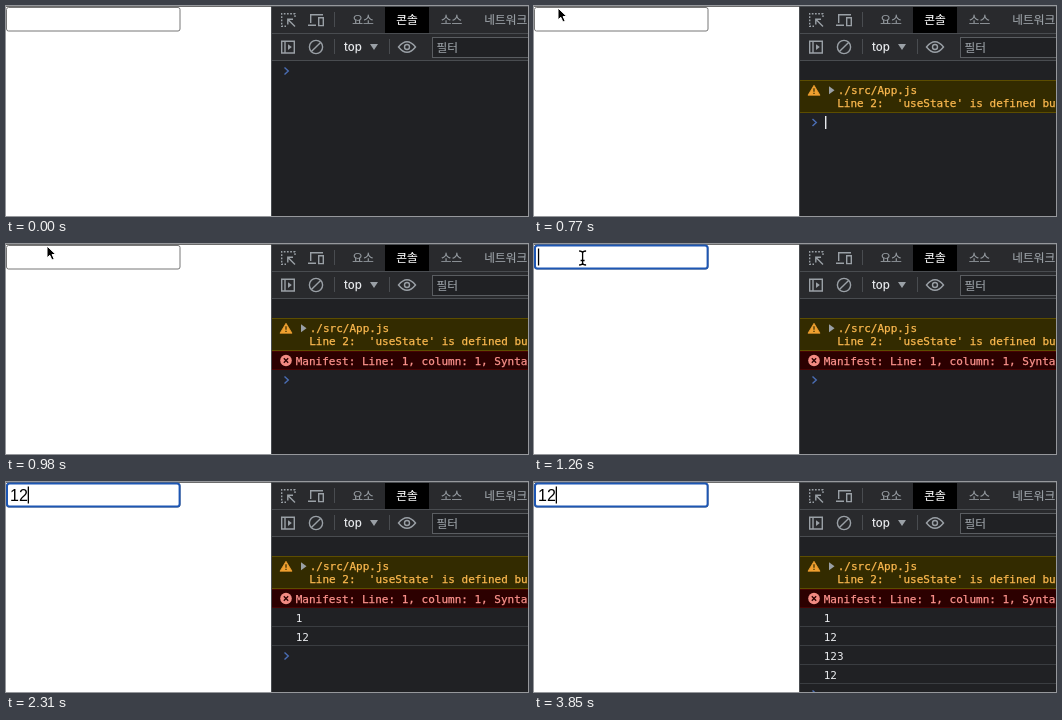
These frames come from a looping animation (522 by 210 pixels, 3920 ms). An HTML page:

```html
<!DOCTYPE html>
<html lang="ko">
<head>
<meta charset="utf-8">
<style>
html, body { margin: 0; width: 100%; height: 100%; overflow: hidden; background: #fff; }
svg { display: block; }
text { white-space: pre; }
.mono { font: 11px "DejaVu Sans Mono", monospace; stroke-width: .25; }
.ko { font: 11.7px "Noto Sans CJK KR", "Noto Sans CJK", sans-serif; fill: #9aa0a6; stroke: #9aa0a6; stroke-width: .15; }
.icon { fill: none; stroke: #9aa0a6; stroke-width: 1.4; }
.line { stroke: #494c50; }
.rule { stroke: #3a3d41; }
</style>
</head>
<body>
<svg width="522" height="210" viewBox="0 0 522 210">
  <rect width="522" height="210" fill="#fff"/>
  <path d="M0 .5H265" stroke="#6c6c6c"/>

  <rect id="box" x=".5" y="1.5" width="173.5" height="23.5" rx="2" fill="#fff" stroke="#767676"/>
  <rect id="ring" x="1" y="1.6" width="172.6" height="22.8" rx="2.5" fill="#fff" stroke="#1d56b3" stroke-width="2"/>
  <text id="value" x="4" y="18.6" font-family="Liberation Sans, Arial, sans-serif" font-size="16"></text>
  <rect id="caret" y="4.5" width="1.3" height="17" fill="#000"/>

  <g id="pointer" stroke="#fff" stroke-linejoin="round">
    <path id="resize" d="M-8 0L-3 -5V-1.7H3V-5L8 0L3 5V1.7H-3V5Z"/>
    <path id="arrow" d="M0 0V11.8L2.8 9.3L4.9 14L7.2 13L5.1 8.5H8.8Z"/>
    <path id="beam" d="M-3.5 -7Q0 -7 0 -5Q0 -7 3.5 -7M0 -5.5V5.5M-2 2.5H2M-3.5 7Q0 7 0 5Q0 7 3.5 7" fill="none" stroke="#000" stroke-width="1.3"/>
  </g>

  <rect x="265" width="257" height="210" fill="#202124"/>
  <g id="console">
    <path id="topRule" class="rule" d="M266 74.5H522"/>
    <g id="warning">
      <rect x="266" y="74" width="256" height="33" fill="#332b00"/>
      <path d="M266 74.5H522M266 106.5H522" stroke="#5c4d00"/>
      <path d="M280 79.3L286 89.2H274Z" fill="#f0a030" stroke="#f0a030" stroke-linejoin="round" stroke-width=".8"/>
      <path d="M280 82.3V85.7M280 86.8V88.1" stroke="#332b00" stroke-width="1.2"/>
      <path d="M295 80.3L300.5 84.3L295 88.3Z" fill="#9aa0a6"/>
      <g class="mono" fill="#fcb94f" stroke="#fcb94f">
        <text x="303.7" y="88">./src/App.js</text>
        <text x="303.2" y="101">Line 2:  'useState' is defined but never used</text>
      </g>
    </g>
    <g id="error">
      <rect x="266" y="107" width="256" height="19" fill="#2c0000"/>
      <path d="M266 107.5H522M266 125.5H522" stroke="#480303"/>
      <circle cx="280" cy="116.5" r="5.8" fill="#f28b82"/>
      <path d="M277.8 114.3L282.2 118.7M282.2 114.3L277.8 118.7" stroke="#290000" stroke-width="1.3"/>
      <text class="mono" x="289.7" y="120.7" fill="#fd938d" stroke="#fd938d">Manifest: Line: 1, column: 1, Syntax error.</text>
    </g>
    <g id="logs"></g>
    <g id="prompt">
      <path d="M278.5 -3.6L282.3 0L278.5 3.6" fill="none" stroke="#4a6db4" stroke-width="1.4"/>
      <rect id="conCaret" x="291" y="-6.5" width="1.4" height="13" fill="#e8eaed"/>
    </g>
  </g>

  <rect x="265" width="257" height="54" fill="#292a2d"/>
  <rect x="379" y="1" width="44" height="26" fill="#000"/>
  <path class="line" d="M265.5 0V210M265 .5H522M266 27.5H522M266 54.5H522M328.5 6V21M328.5 33V48M383.5 33V48"/>

  <g class="icon">
    <path d="M289 11V7.7H275.7V20.3H280" stroke-dasharray="1.7 1.5"/>
    <path d="M282 13.5L289 20.5M281.8 18.5V13.3H287"/>
    <path d="M304.7 17V8.7H317M302 19.3H310M312.7 11.7H317.3V19.6H312.7Z"/>
    <path d="M275.7 35.2H288.3V47H275.7ZM279 35V47"/>
    <path d="M282 38.3L285.8 41.1L282 44Z" fill="#9aa0a6" stroke="none"/>
    <circle cx="310" cy="41" r="6.6"/>
    <path d="M305.4 45.6L314.6 36.4"/>
    <path d="M392.5 41Q401 30.5 409.5 41Q401 51.5 392.5 41Z"/>
    <circle cx="401" cy="41" r="2.5"/>
  </g>
  <path d="M364 38H372L368 44Z" fill="#9aa0a6"/>
  <text x="338" y="45" font-family="Inter, sans-serif" font-size="11.5" font-weight="500" fill="#e8eaed">top</text>
  <rect x="426.5" y="31.5" width="110" height="20" fill="#202124" stroke="#5a5d61"/>
  <g class="ko">
    <text x="346.3" y="18">요소</text>
    <text x="390.3" y="18" style="fill:#fff;stroke:#fff">콘솔</text>
    <text x="434.8" y="18">소스</text>
    <text x="478.3" y="18">네트워크</text>
    <text x="430.5" y="45.5">필터</text>
  </g>
</svg>
<script>
const LOOP = 3920, STEP = 70, CHAR = 8.9, ROW = 19;
const $ = id => document.getElementById(id);
const show = (id, on) => $(id).setAttribute('display', on ? 'inline' : 'none');
const move = (id, x, y) => $(id).setAttribute('transform', `translate(${x} ${y})`);

const RELOAD = 420, WARN = 770, ERROR = 910, FOCUS = 1190;
// time of each edit and the resulting text; the log follows one step later
const edits = [[1680, '1'], [2030, '12'], [2380, '123'], [3360, '12']];
// pointer: time, x, y
const path = [[420, 0, 36], [490, 0, 33], [630, 8, 24], [840, 32, -9], [980, 41, 2], [1190, 48.6, 14], [1680, 48.6, 14]];

edits.forEach(([, text], i) => {
  const y = 126 + i * ROW;
  $('logs').innerHTML += `<g id="log${i}"><text class="mono" x="289.7" y="${y + 13.7}" fill="#e8eaed">${text}</text>
    <path class="rule" d="M266 ${y + 18.5}H522"/></g>`;
});

function pointerAt(t) {
  const i = path.findIndex(p => p[0] > t);
  if (i < 1) return null;
  const [t0, x0, y0] = path[i - 1], [t1, x1, y1] = path[i];
  const k = (t - t0) / (t1 - t0);
  return [x0 + (x1 - x0) * k, y0 + (y1 - y0) * k];
}

function drawPointer(t) {
  const p = pointerAt(t);
  show('pointer', p);
  if (!p) return;
  move('pointer', ...p);
  const kind = p[0] < 3 ? 'resize' : t > 980 ? 'beam' : 'arrow';
  for (const id of ['resize', 'arrow', 'beam']) show(id, id === kind);
}

function drawInput(t) {
  const done = edits.filter(e => t >= e[0]);
  const [since, text] = done.length ? done[done.length - 1] : [FOCUS, ''];
  const focused = t >= FOCUS;
  show('ring', focused);
  $('value').textContent = text;
  $('caret').setAttribute('x', 3.9 + text.length * CHAR);
  show('caret', focused && (t - since) % 1000 < 550);
}

function drawConsole(t) {
  const logs = edits.filter(e => t >= e[0] + STEP).length;
  edits.forEach((e, i) => show('log' + i, i < logs));
  show('topRule', t >= RELOAD);
  show('warning', t >= WARN);
  show('error', t >= ERROR);
  const y = t < RELOAD ? 65 : t < WARN ? 84.5 : t < ERROR ? 116.5 : 136 + logs * ROW;
  move('prompt', 0, y);
  show('conCaret', t >= 280 && t < ERROR);
}

function frame(now) {
  const t = Math.floor(now % LOOP / STEP) * STEP;
  drawPointer(t);
  drawInput(t);
  drawConsole(t);
  requestAnimationFrame(frame);
}
frame(performance.now());
</script>
</body>
</html>
```
